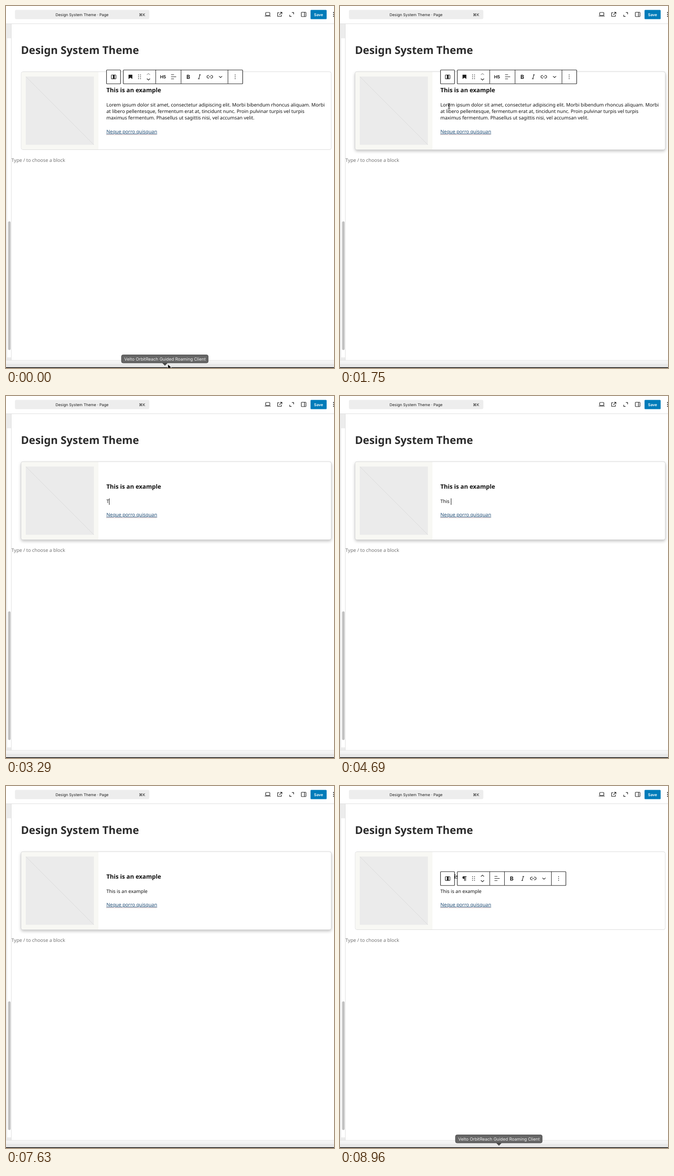
An HTML page that plays this animation: 713x785 px, repeating every 9030 ms.

```html
<!DOCTYPE html>
<html lang="en">
<head>
<meta charset="utf-8">
<title>Block editor</title>
<style>
html, body { margin: 0; width: 100%; height: 100%; overflow: hidden; background: #fff; }
body { position: relative; text-rendering: geometricPrecision; color: #111;
  font: 10.4px/14.33px "Noto Sans", sans-serif; white-space: pre; }
svg { position: absolute; left: 0; top: 0; }
svg text { font-family: Inter, sans-serif; text-anchor: middle; }
.line { fill: none; stroke: #1e1e1e; stroke-width: 1.2; }
.frame { fill: #fff; stroke: #1e1e1e; stroke-width: 1.15; }
h1, #content, #hint { position: absolute; margin: 0; }
h1 { left: 32.5px; top: 79px; font-size: 23.4px; line-height: 32px; color: #2b2b2b; }
#content { left: 218.2px; top: 142.5px; height: 169px; display: flex; flex-direction: column;
  justify-content: center; align-items: flex-start; gap: 15.4px; }
h5 { margin: 0; font-size: 13px; line-height: 17.7px; }
#hint { left: 11.8px; top: 327.6px; font-size: 10.37px; color: #757575; }
#lorem, #typed { position: relative; top: .5px; }
#lorem div { width: fit-content; }
#lorem.sel div { background: #b3d7ff; }
#lorem.sel div:not(:last-child) { padding-right: 4.6px; }
u { text-decoration: none; }
.focus u, .link { text-decoration: underline dotted #e0524c 1px; text-underline-offset: 2px; }
.link { font-size: 10.37px; text-decoration-color: #e0524c99; text-underline-offset: 2.6px; }
.link span { color: #1c4a73; text-decoration: underline #1c4a73 1px; text-underline-offset: 1.4px; }
#caret { position: absolute; width: 1px; height: 14.3px; background: #111; }
</style>
</head>
<body>
<svg width="713" height="785">
  <!-- window frame -->
  <path d="M0 38.5H713M11.5 39V768M0 768.5H713" class="line" style="stroke:#dedede;stroke-width:1"/>
  <path d="M0 39h11v31H0zM0 70h2.5v693H0zM0 762h11v6H0z" fill="#ececec"/>
  <rect x="4.5" y="467" width="5.5" height="279" rx="2.7" fill="#c2c2c2"/>
  <rect y="770" width="713" height="6" fill="#f3f3f3"/>
  <rect y="776" width="713" height="7.5" fill="#e8e8e8"/>
  <rect y="783.5" width="713" height="1.5" fill="#000"/>
  <!-- header -->
  <rect x="19.5" y="8.5" width="292" height="20" rx="3" fill="#ededed"/>
  <text x="165.3" y="21.6" font-size="8.3" fill="#1e1e1e">Design System Theme · Page</text>
  <text x="295.7" y="21.6" font-size="8.3" fill="#1e1e1e">⌘K</text>
  <g class="line">
    <rect x="564.5" y="14" width="9" height="6.5" rx="1"/>
    <path d="M562.5 22h13M594 14.5h-3.5v8h8V19M595.8 13.6h4v4M599.7 13.7l-5.6 5.6
      M621.5 14.2h3.8V18M616.8 19v3.7h3.8"/>
    <rect x="642" y="13.5" width="10" height="9.5" rx="1"/><path d="M648.6 13.5V23"/>
  </g>
  <rect x="662" y="8.5" width="35" height="20" rx="1.5" fill="#007cba"/>
  <text x="679.4" y="21.6" font-size="8.3" font-weight="600" fill="#fff">Save</text>
  <path d="M711 13.2h2v1.8h-2zM711 17.2h2v1.8h-2zM711 21.2h2v1.8h-2z" fill="#1e1e1e"/>
  <!-- card -->
  <rect id="shadow" x="33" y="142.5" width="674" height="169" rx="4" fill="#fff" stroke="#bbb"
    style="filter:drop-shadow(0 3px 3px rgba(0,0,0,.24))"/>
  <rect x="33" y="142.5" width="674" height="169" rx="4" fill="#fff" stroke="#dcdcdc"/>
  <path d="M201 143H37a3.5 3.5 0 0 0-3.5 3.5v161A3.5 3.5 0 0 0 37 311H201z" fill="#f8f8f4"/>
  <rect x="43" y="153" width="148" height="148" fill="#ebebeb"/>
  <path d="M43 153l148 148" stroke="#dadada"/>
</svg>

<h1>Design System Theme</h1>
<div id="content"><h5>This is an example</h5><div id="lorem"><div>Lorem ipsum dolor sit <u>amet</u>, <u>consectetur</u> <u>adipiscing</u> elit. Morbi <u>bibendum</u> rhoncus <u>aliquam</u>. Morbi</div><div>at libero <u>pellentesque</u>, fermentum erat at, <u>tincidunt</u> nunc. <u>Proin</u> pulvinar turpis vel turpis</div><div>maximus fermentum. Phasellus ut <u>sagittis</u> nisi, vel <u>accumsan</u> <u>velit</u>.</div></div><div id="typed"><span id="words"></span><i id="caret"></i></div><div class="link"><span>Neque porro quisquan</span></div></div>
<div id="hint">Type / to choose a block</div>

<svg width="713" height="785">
  <g id="bar" fill="#1e1e1e">
    <rect x="218.5" y="-14.8" width="30.5" height="30" rx="1" class="frame"/>
    <rect id="box" x="255" y="-14.8" height="30" rx="1" class="frame"/>
    <rect x="229" y="-4" width="10" height="8.4" rx="1" class="line"/>
    <path d="M232.4-4h3.8v8.4h-3.8zM325-15h1v30h-1z"/>
    <path id="mark" d="M266.4-4.5h8.2v9.3l-4.1-3-4.1 3z"/>
    <path id="pilcrow" d="M275-4.8h-6a2.8 2.8 0 0 0 0 5.6h1v4.4h1.2v-8.8h1.3v8.8h1.2v-8.8H275z"/>
    <path class="line" stroke-dasharray="1.6 2.4" style="stroke-width:1.6" d="M288.2-4.8V5M292.4-4.8V5"/>
    <path id="up" class="line" d="M306.3-4.1l3.4-3.2 3.4 3.2"/>
    <path class="line" d="M306.3 4l3.4 3.2 3.4-3.2"/>
    <text id="level" x="341.4" y="3.4" font-size="9.4" font-weight="700">H5</text>
    <g id="tail">
      <path d="M357-15h1v30h-1zM459-15h1v30h-1z"/>
      <path class="line" d="M335.8-4.5h6.4M335.8 0h11.2M335.8 4.5h6.4"/>
      <text x="373.2" y="4.4" font-size="12" font-weight="700">B</text>
      <path class="line" d="M396.8-4.4h3.4M398.6-4.4l-2.5 8.8M394.4 4.4h3.4
        M418.6-3h-1.7a3 3 0 0 0 0 6h1.7M421.6-3h1.7a3 3 0 0 1 0 6h-1.7M417.5 0h5.2M440-1.4l3.4 3 3.4-3"/>
      <path class="line" stroke-dasharray="1.6 2.4" style="stroke-width:1.6" d="M475.2-4.8V5"/>
    </g>
  </g>
  <g id="tip">
    <path d="M339.5 774h12l-6 6z" fill="#484848"/>
    <rect x="251" y="756.5" width="188.5" height="17.5" rx="3.5" fill="#666" stroke="#484848"/>
    <text x="345.5" y="768.9" font-size="9.3" fill="#f2f2f2">Velto OrbitReach Guided Roaming Client</text>
  </g>
  <path id="arrow" d="M0 0v10.6l2.5-2.3 1.8 4 1.9-.8-1.8-3.9h3.4z" fill="#000" stroke="#fff" stroke-width=".6"/>
  <path id="beam" class="line" style="stroke-width:1" d="M-2.5-6q2.5 0 2.5 1.5v9q0 1.5-2.5 1.5M2.5-6q-2.5 0-2.5 1.5v9q0 1.5 2.5 1.5"/>
</svg>

<script>
const LOOP = 9030, STEP = 70, PHRASE = 'This is an example';
const $ = id => document.getElementById(id);
const show = (id, on) => { $(id).style.display = on ? '' : 'none'; };
const place = (id, x, y) => $(id).setAttribute('transform', `translate(${x} ${y})`);
const ramp = (t, a, b) => Math.min(1, Math.max(0, (t - a) / (b - a)));

// [time, characters typed]
const keys = [[3150, 1], [3500, 2], [3640, 3], [3850, 4], [4130, 5], [4620, 4], [4690, 5], [4970, 6],
  [5040, 7], [5180, 8], [5390, 9], [5530, 10], [5670, 11], [5740, 12], [6020, 13], [6300, 15],
  [6930, 16], [7000, 17], [7070, 18]];

// [time, x, y] of the pointer
const track = [[0, 352, 777], [630, 219.5, 208], [840, 219.5, 208], [1050, 234.5, 221], [1189, 234.5, 221],
  [1190, 238.5, 226], [1400, 238.5, 226], [1750, 237, 217], [2450, 234, 217], [2660, 243, 222],
  [7980, 238, 222], [8890, 348, 781], [8960, 348, 792]];

function pointer(t) {
  const i = track.findLastIndex(k => k[0] <= t);
  const [a, x, y] = track[i], [b, x2, y2] = track[i + 1] || track[i];
  const p = b > a ? ramp(t, a, b) : 0, e = p * p * (3 - 2 * p);
  return [x + (x2 - x) * e, y + (y2 - y) * e];
}

function draw(now) {
  const t = Math.floor(now % LOOP / STEP) * STEP;
  const heading = t < 1960, typing = t >= 3150, back = t >= 8050;

  const count = (keys.findLast(k => k[0] <= t) || [0, 0])[1];
  $('words').textContent = PHRASE.slice(0, count);
  show('lorem', !typing);
  show('typed', typing);
  show('caret', t < 7630 && !(t >= 6790 && t < 6930));
  $('lorem').className = (heading ? '' : 'focus') + (t >= 2170 ? ' sel' : '');

  show('bar', t < 3290 || back);
  $('bar').style.opacity = back ? 1 : 1 - ramp(t, 3080, 3290);
  place('bar', 0, heading ? 153.5 : back ? 200.5 : 186.5);
  place('tail', heading ? 23 : 0, 0);
  $('box').setAttribute('width', heading ? 259.5 : 236);
  $('up').style.stroke = heading ? '#999' : '';
  show('mark', heading);
  show('level', heading);
  show('pilcrow', !heading);

  $('shadow').style.opacity = ramp(t, 630, 770) - ramp(t, 8330, 8610);
  show('tip', t < 70 || t >= 8960);

  const [x, y] = pointer(t);
  place('arrow', x, y);
  place('beam', x, y);
  show('arrow', t < 1190 || back);
  show('beam', t >= 1190 && t < 1960 || t >= 2520 && t < 2660);
  requestAnimationFrame(draw);
}
requestAnimationFrame(draw);
</script>
</body>
</html>
```
